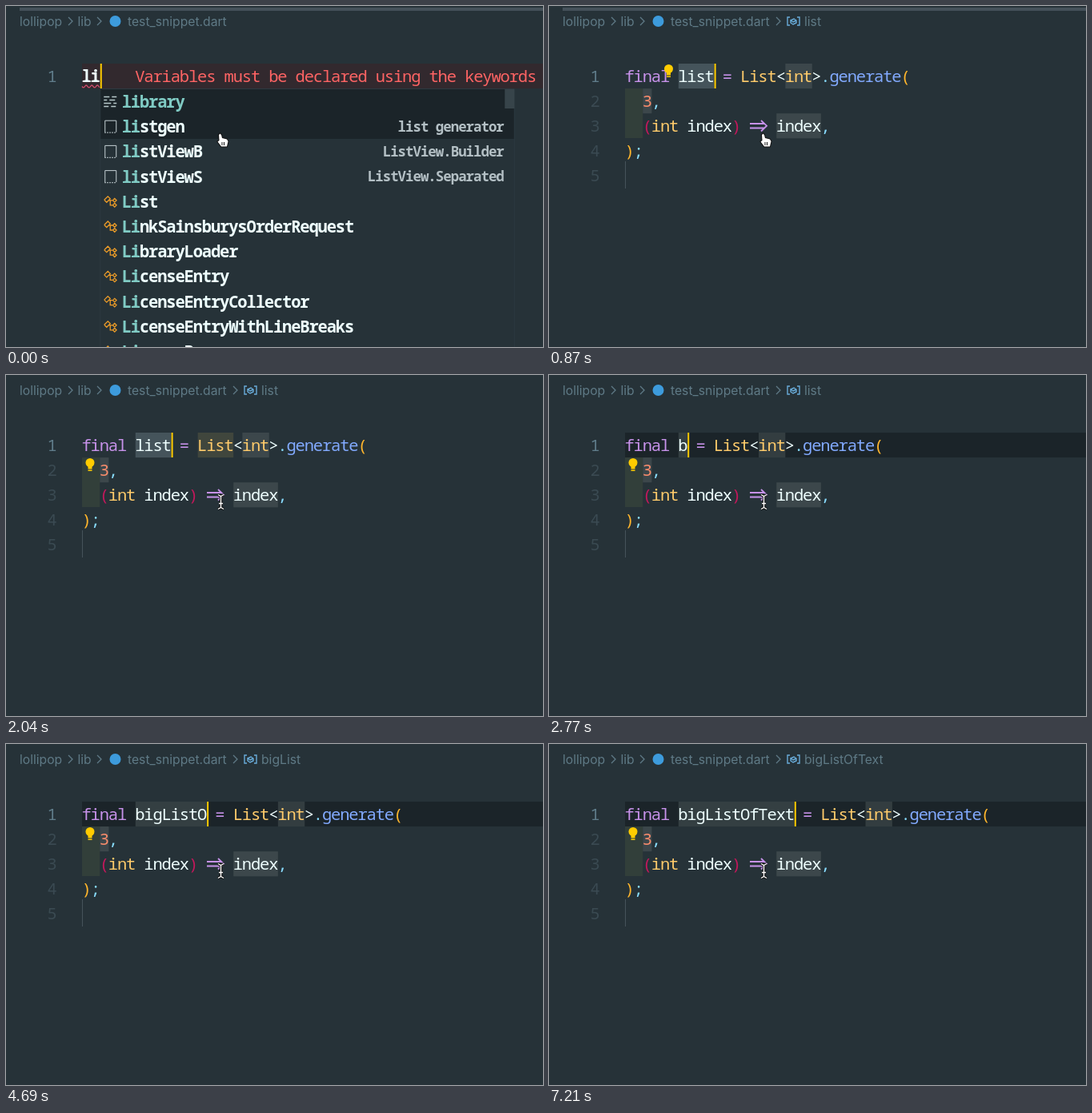
These frames come from a looping animation (671x426 px, 8000 ms). An HTML page with a canvas:

```html
<!DOCTYPE html>
<html>
<head>
<meta charset="utf-8">
<style>
html, body { margin: 0; width: 671px; height: 426px; overflow: hidden; background: #263238; }
canvas { display: block; }
</style>
</head>
<body>
<canvas id="stage" width="671" height="426"></canvas>
<script>
const ctx = document.getElementById('stage').getContext('2d');
const LOOP = 8000, LEFT = 95, CHAR = 11.13, ROW = 31.1, TOP = 72;
const UI = 'Inter, sans-serif', MONO = '"Noto Sans Mono", monospace';
const C = {
  bg: '#263238', dark: '#1b2429', white: '#eeffff', purple: '#c792ea', gold: '#ffcb6b',
  cyan: '#89ddff', blue: '#82aaff', bracket: '#ffb62c', pink: '#c2185b', orange: '#f78c6c',
  teal: '#80cbc4', crumb: '#5f7a86', caret: '#ffcc00', error: '#ff6464', detail: '#b4c0c5',
  icon: '#ee9d28'
};

// Each entry: start time, value.
const typed = [[0, 'li'], [140, 'lis'], [290, 'list'], [2770, 'b'], [2920, 'bi'], [3060, 'big'],
  [3510, 'bigL'], [3650, 'bigLi'], [3800, 'bigLis'], [3950, 'bigList'], [4690, 'bigListO'],
  [4980, 'bigListOf'], [5430, 'bigListOfC'], [5880, 'bigListOf'], [6330, 'bigListOfT'],
  [6470, 'bigListOfTe'], [6620, 'bigListOfTex'], [6760, 'bigListOfText']];
const symbols = [[0, ''], [720, 'list'], [3360, 'big'], [4400, 'bigList'], [5430, 'bigListOf'],
  [5880, 'bigListOfC'], [6180, 'bigListOf'], [7210, 'bigListOfText']];
const at = (track, t) => track.filter(([start]) => start <= t).pop()[1];

const snippets = [['snippet', 'listgen', 'list generator'], ['snippet', 'listViewB', 'ListView.Builder'],
  ['snippet', 'listViewS', 'ListView.Separated'], ['class', 'List']];
const classes = names => names.split(' ').map(name => ['class', name]);
const shortMenu = [['keyword', 'library'], ...snippets, ...classes('LinkSainsburysOrderRequest ' +
  'LibraryLoader LicenseEntry LicenseEntryCollector LicenseEntryWithLineBreaks LicenseParser')];
const longMenu = [...snippets, ...classes('ListBody ListBody ListBody ListBodyParentData ListEquality'),
  ['enum', 'ListFormat'], ['class', 'ListMixin']];

function box(x, y, w, h, color) {
  ctx.fillStyle = color;
  ctx.fillRect(x, y, w, h);
}

function trace(...paths) {
  ctx.beginPath();
  for (const p of paths)
    for (let i = 0; i < p.length; i += 2) ctx[i ? 'lineTo' : 'moveTo'](p[i], p[i + 1]);
}

function line(color, width, ...paths) {
  ctx.strokeStyle = color;
  ctx.lineWidth = width;
  trace(...paths);
  ctx.stroke();
}

const diamond = (x, y, r) => [x - r, y, x, y - r, x + r, y, x, y + r, x - r, y];

// A tall, narrow face tracked to the editor's column pitch.
function mono(str, x, y, color, weight = 500, pitch = CHAR) {
  ctx.font = `${weight} ${pitch * 1.84}px ${MONO}`;
  ctx.fontStretch = 'semi-condensed';
  ctx.letterSpacing = '0px';
  const spacing = pitch - ctx.measureText('0').width;
  ctx.letterSpacing = spacing + 'px';
  ctx.fillStyle = color;
  ctx.fillText(str, x + spacing / 2, y);
}

function code(row, parts) {
  let x = LEFT;
  for (const [str, color] of parts) {
    mono(str, x, 95 + row * ROW, color);
    x += str.length * CHAR;
  }
}

const cell = (row, col, count, color) =>
  box(LEFT + col * CHAR, TOP + row * ROW, count * CHAR, ROW, color);

function breadcrumb(symbol) {
  ctx.font = `15.7px ${UI}`;
  ctx.fontStretch = 'normal';
  ctx.letterSpacing = '0px';
  const label = (str, x) => {
    ctx.fillStyle = C.crumb;
    ctx.fillText(str, x, 25);
  };
  const chevron = x => line(C.crumb, 1.3, [x, 14, x + 5, 19, x, 24]);
  label('lollipop', 17);
  chevron(78);
  label('lib', 89.5);
  chevron(114);
  label('test_snippet.dart', 152);
  ctx.fillStyle = '#3d9bdc';
  ctx.beginPath();
  ctx.arc(136.5, 19, 7, 0, 7);
  ctx.fill();
  if (!symbol) return;
  chevron(284);
  label(symbol, 319);
  line('#69acd9', 1.4, [301, 14, 298, 14, 298, 24, 301, 24], [310, 14, 313, 14, 313, 24, 310, 24],
    [302, 18, 306, 16, 309, 18, 309, 21, 305, 23, 302, 21, 302, 18, 305, 20, 309, 18]);
}

function bulb(x, y) {
  ctx.fillStyle = C.caret;
  ctx.beginPath();
  ctx.arc(x, y, 5.5, 0, 7);
  ctx.fill();
  box(x - 2.5, y + 4, 5, 4, C.caret);
  box(x - 2.5, y + 9, 5, 1.5, C.caret);
}

function icon(kind, x, y) {
  if (kind === 'snippet') {
    line('#c5d0d4', 1, [x + 1.5, y + 7, x + 1.5, y - 7.5, x + 15.5, y - 7.5, x + 15.5, y + 7]);
    ctx.setLineDash([1.5, 1.5]);
    line('#c5d0d4', 1.3, [x + 1, y + 7.5, x + 16, y + 7.5]);
    ctx.setLineDash([]);
  } else if (kind === 'class') {
    line(C.icon, 1.3, [x + .5, y - 2, x + 5, y - 6.5, x + 8, y - 3.5, x + 3.5, y + 1, x + .5, y - 2],
      [x + 6, y - 1.5, x + 11, y - 1.5], [x + 8, y - 1.5, x + 8, y + 4.5, x + 11, y + 4.5],
      diamond(x + 13.5, y - 1.5, 2.3), diamond(x + 13.5, y + 4.5, 2.3));
  } else if (kind === 'enum') {
    line(C.icon, 1.3, [x + 6, y - 2, x + 6, y - 6, x + 16, y - 6, x + 16, y + 2, x + 11, y + 2],
      [x + 1, y - 1, x + 10, y - 1, x + 10, y + 6, x + 1, y + 6, x + 1, y - 1],
      [x + 3, y + 1.5, x + 8, y + 1.5], [x + 3, y + 3.5, x + 8, y + 3.5], [x + 9, y - 3, x + 14, y - 3]);
  } else {
    line('#b9c9cc', 1.4, [x, y - 6, x + 7, y - 6], [x + 10, y - 6, x + 16, y - 6],
      [x, y - 2, x + 4, y - 2], [x + 7, y - 2, x + 14, y - 2], [x, y + 2, x + 9, y + 2],
      [x + 12, y + 2, x + 16, y + 2], [x, y + 6, x + 6, y + 6], [x + 9, y + 6, x + 15, y + 6]);
  }
}

function menu(word, showDetails) {
  const x = LEFT + word.length * CHAR, right = x + 518, pitch = 9.44;
  const items = word === 'li' ? shortMenu : longMenu;
  box(x, 103, 518, 323, C.bg);
  box(x, 103, 518, 63, C.dark);
  line('#2d3a41', 1, [x + .5, 426, x + .5, 103.5, right, 103.5, right, 426]);
  box(right - 12, 104, 12, 24, '#37444a');
  items.forEach(([kind, name, detail], i) => {
    const mid = 119.5 + i * 31.2, base = mid + 7.5;
    const matched = i ? word.length : name.length;
    icon(kind, x + 5, mid);
    mono(name.slice(0, matched), x + 28, base, C.teal, 600);
    mono(name.slice(matched), x + 28 + matched * CHAR, base, C.white, 600);
    if (detail)
      mono(detail, right - 13 - detail.length * pitch, mid + 6, i ? C.detail : '#609b98', 600, pitch);
  });
  if (!showDetails) return;
  box(right + 1, 103, 20, 217, C.bg);
  line('#1c2529', 1, [671, 103.5, right + 1, 103.5], [right + 1, 320.5, 671, 320.5]);
  mono('Creates', 663, 132, C.detail);
  mono('returns', 663, 163, C.detail);
  mono('final', 663, 213, C.purple, 600);
  mono(')', 663, 306, C.white, 600);
}

function hand() {
  trace([266.5, 168, 266, 161, 267.5, 159.5, 269, 161, 270, 165, 276, 166.5, 277.5, 169,
    276, 175.5, 269, 175.5, 264.5, 169.5, 266.5, 168]);
  ctx.strokeStyle = '#111';
  ctx.lineWidth = 2;
  ctx.stroke();
  ctx.fillStyle = '#fff';
  ctx.fill();
  line('#111', 1, [270, 170, 270, 174], [272.5, 170, 272.5, 174]);
}

function beam() {
  const shape = [[265, 149.5, 268.5, 151.5, 272, 149.5], [268.5, 151, 268.5, 166],
    [265, 167.5, 268.5, 165.5, 272, 167.5], [266, 160.5, 271, 160.5]];
  line('#111', 3.4, ...shape);
  line('#fff', 1.4, ...shape);
}

function lineNumbers(count) {
  for (let i = 0; i < count; i++)
    mono(String(i + 1), 52, 95 + i * ROW, i ? '#3a4a52' : '#607d8b');
}

function completing(t, word) {
  const end = LEFT + word.length * CHAR;
  box(LEFT, TOP, 576, 31, '#32292e');
  lineNumbers(1);
  mono(word, LEFT, 95, C.white, 600);
  const wave = [];
  for (let x = LEFT; x <= end; x++) wave.push(x, 100.5 + 1.5 * Math.sin((x - LEFT) * .9));
  line('#d85272', 1.2, wave);
  mono("Variables must be declared using the keywords 'const'", end + 4 * CHAR, 95, C.error);
  if (t >= 720) bulb(149.5, 78.5);
  menu(word, t >= 430);
  box(end + .5, TOP, 2, 31, C.caret);
}

function editing(t, name) {
  const n = name.length, selected = t < 2770;
  if (!selected) box(LEFT, TOP, 576, 31, C.dark);
  box(LEFT, 103, 2 * CHAR, 62, '#323f3a');
  cell(0, 6, n, selected ? '#45545b' : '#343f42');
  if (selected && t >= 1020) cell(0, n + 9, 4, '#40463d');
  cell(0, n + 14, 3, selected ? '#3c474b' : '#333d40');
  cell(1, 2, 1, '#3c474b');
  cell(2, 17, 5, '#3c474b');
  line('#45535a', 1, [95.5, 194, 95.5, 228]);
  lineNumbers(5);
  code(0, [['final ', C.purple], [name, C.white], [' = ', C.purple], ['List', C.gold], ['<', C.white],
    ['int', C.gold], ['>', C.white], ['.', C.cyan], ['generate', C.blue], ['(', C.bracket]]);
  code(1, [['  ', C.white], ['3', C.orange], [',', C.cyan]]);
  code(2, [['  ', C.white], ['(', C.pink], ['int ', C.gold], ['index', C.white], [')', C.pink],
    ['    ', C.white], ['index', C.white], [',', C.cyan]]);
  code(3, [[')', C.bracket], [';', C.cyan]]);
  line(C.purple, 1.8, [251, 147, 269, 147], [251, 152.5, 269, 152.5], [265, 143, 272, 149.7, 265, 156.5]);
  box(LEFT + (6 + n) * CHAR + .3, TOP, 2, 31, C.caret);
  if (t < 1160) bulb(149.5, 78.5);
  else bulb(105, 109.5);
}

function draw(t) {
  box(0, 0, 671, 426, C.bg);
  if (t < 2040) box(17, 2, 654, 4, '#45515a');
  breadcrumb(at(symbols, t));
  (t < 870 ? completing : editing)(t, at(typed, t));
  (t < 1020 ? hand : beam)();
}

function tick() {
  draw(performance.now() % LOOP);
  requestAnimationFrame(tick);
}
tick();
</script>
</body>
</html>
```
